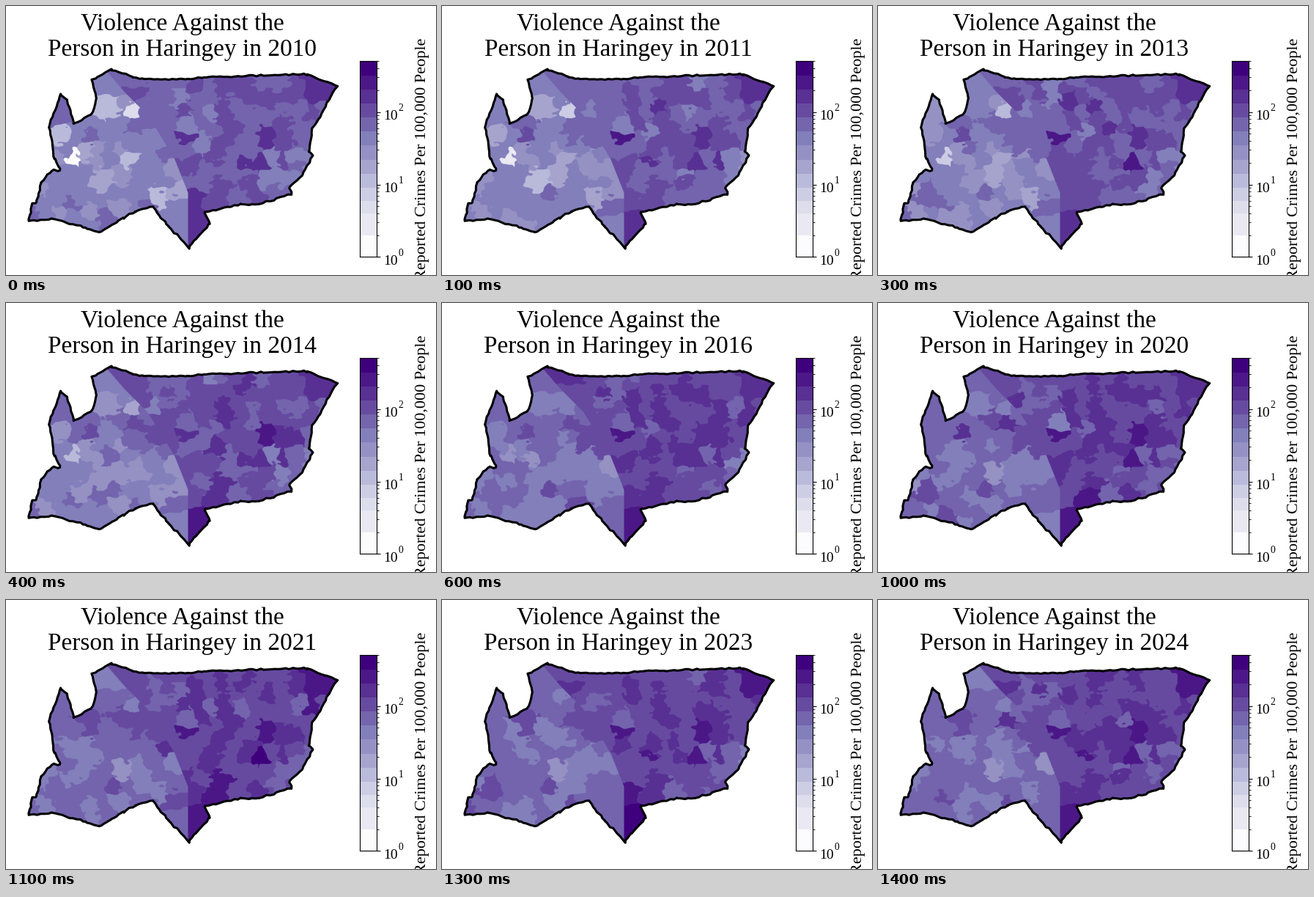
These frames come from a looping animation (587 px wide and 367 px high, 1.5 s). A matplotlib script:

```python
import numpy as np
import matplotlib.pyplot as plt
from matplotlib.animation import FuncAnimation
from matplotlib.patches import Polygon
from matplotlib.path import Path
from matplotlib.ticker import LogLocator, NullFormatter

W, H, DPI = 587, 367, 100
FIRST, LAST = 2010, 2024
YEARS = np.arange(FIRST, LAST + 1)
CELLS = 150
SPACING = 18

plt.rcParams["font.family"] = "Liberation Serif"
rng = np.random.default_rng(11)

# Colour classes: rounded log-spaced rates per 100,000
EDGES = np.round(np.geomspace(1, 500, 15))
TOP = len(EDGES) - 2
PALETTE = plt.get_cmap("Purples")(np.linspace(0, 1, TOP + 1))[:, :3]

# Corners of the borough, clockwise from the north-west peak
CORNERS = [(144, 87), (173, 97), (188, 100), (246, 100), (273, 97), (410, 93),
           (452, 109), (427, 153), (418, 168), (414, 198), (419, 204),
           (405, 230), (387, 247), (390, 257), (343, 271), (320, 270),
           (271, 282), (278, 297), (250, 329), (222, 301), (200, 273),
           (178, 280), (160, 289), (146, 298), (127, 309), (108, 303),
           (64, 290), (31, 294), (36, 270), (42, 268), (48, 240), (62, 225),
           (74, 224), (66, 208), (59, 163), (75, 120), (84, 130), (93, 161),
           (118, 146), (124, 126), (117, 101)]

# Areas that differ from their surroundings: x, y, reach, class offset
PLACES = [(262, 300, 34, 2), (235, 300, 24, 0), (425, 112, 32, 1.2),
          (243, 180, 19, 2), (357, 178, 19, 1.7), (345, 214, 18, 1.8),
          (290, 243, 18, 1), (113, 178, 19, 1.6), (92, 208, 18, -8),
          (75, 180, 20, -2), (130, 237, 24, -3), (166, 207, 19, -3),
          (140, 137, 24, -2.5), (170, 144, 16, -5), (207, 262, 19, -3),
          (230, 252, 18, -2), (148, 108, 32, 0), (75, 143, 28, 0.3)]


def rail(y):
    """x of the railway that splits the borough."""
    return np.interp(y, [90, 120, 150, 185, 210, 255, 330],
                     [137, 163, 193, 215, 230, 248, 248])


def is_east(x, y):
    return x > rail(y)


def roughen(points, step=5, amount=0.6):
    """Split a closed line into short steps and jitter each one."""
    pts = np.array(points + points[:1], float)
    along = np.r_[0, np.cumsum(np.hypot(*np.diff(pts, axis=0).T))]
    at = np.union1d(np.arange(0, along[-1], step), along[:-1])
    line = np.c_[np.interp(at, along, pts[:, 0]), np.interp(at, along, pts[:, 1])]
    return line + rng.normal(0, amount, line.shape)


def ripple(x, y, waves=14, size=1.0):
    """Irregular smooth noise from randomly aimed sine waves."""
    total = np.zeros_like(x)
    for length in np.geomspace(8, 45, waves):
        angle, phase = rng.uniform(0, 2 * np.pi, 2)
        total += np.sin(2 * np.pi * (x * np.cos(angle) + y * np.sin(angle)) / length
                        + phase)
    return size * total


def make_sites(border):
    """Named areas first, then random cells that fill the widest gaps."""
    shape = Path(border)
    sites = [p[:3] for p in PLACES]
    sites += [(rail(y) - 8, y, 16) for y in (155, 180, 205)]
    while len(sites) < CELLS:
        pts = rng.uniform((30, 85), (452, 330), (40, 2))
        pts = pts[shape.contains_points(pts)]
        room = np.min([np.hypot(*(pts - s[:2]).T) - s[2] for s in sites], axis=0)
        sites.append((*pts[np.argmax(room)], rng.normal(SPACING, 3)))
    return np.array(sites)


def label_cells(sites, x, y):
    """Index of the owning site for each grid point, with ragged edges."""
    wx, wy = x + ripple(x, y), y + ripple(x, y)
    side = is_east(x, y)
    best = np.full(x.shape, np.inf)
    owner = np.zeros(x.shape, int)
    for i, (sx, sy, reach) in enumerate(sites):
        d = np.hypot(wx - sx, wy - sy) - 0.6 * (reach - SPACING)
        d += 1000 * (side != is_east(sx, sy))
        near = d < best
        best[near] = d[near]
        owner[near] = i
    return owner


def make_levels(sites):
    """Colour class of every cell in every year."""
    x, y, _ = sites.T
    usual = np.where(is_east(x, y), 9.4, 7.9)
    usual -= 0.8 * (x + 0.5 * y > 490)  # calmer by the river
    own = np.zeros(len(sites))
    own[len(PLACES):] = rng.normal(0, 0.55, len(sites) - len(PLACES))
    own[:len(PLACES)] = [p[3] for p in PLACES]

    rows = []
    for t in YEARS - FIRST:
        trend = 0.9 / (1 + np.exp(-1.3 * (t - 4.5)))
        # busy areas stay busy, quiet ones catch up
        fade = np.where(own < -1.5, np.exp(-t / 4), 1)
        rows.append(usual + trend + own * fade + rng.normal(0, 0.35, len(sites)))
    classes = np.clip(np.round(rows), 0, TOP).astype(int)
    classes[classes == 1] = 2  # the second class is empty after rounding
    return classes


def draw_scale(fig, stage):
    left, base, width, height = 483, 342.5, 23, 267
    bar = fig.add_axes([left / W, 1 - base / H, width / W, height / H])
    bar.set_yscale("log")
    bar.set_ylim(EDGES[0], EDGES[-1])
    bar.set_xticks([])
    for low, high, color in zip(EDGES, EDGES[1:], PALETTE):
        if high > low:
            bar.axhspan(low, high, color=color, lw=0)
    bar.yaxis.tick_right()
    bar.yaxis.set_minor_locator(LogLocator(subs=range(2, 10)))
    bar.yaxis.set_minor_formatter(NullFormatter())
    bar.tick_params(axis="y", labelright=False)

    decade = height / np.log10(EDGES[-1])
    for power in range(3):
        y = base - power * decade
        stage.text(515.6, y + 10.5, "10", size=14)
        stage.text(535.4, y - 1.2, str(power), size=9.8)


fig = plt.figure(figsize=((W + 1e-6) / DPI, (H + 1e-6) / DPI), dpi=DPI,
                 facecolor="white")
stage = fig.add_axes([0, 0, 1, 1])
stage.axis("off")

left, right, top, bottom = 25, 460, 80, 335
gx, gy = np.meshgrid(np.arange(left, right, 0.5) + 0.25,
                     np.arange(top, bottom, 0.5) + 0.25)
border = roughen(CORNERS)
sites = make_sites(border)
owner = label_cells(sites, gx, gy)
levels = make_levels(sites)

area = stage.imshow(PALETTE[levels[0]][owner], extent=(left, right, bottom, top),
                    aspect="auto")
stage.set_xlim(0, W)
stage.set_ylim(H, 0)
stage.add_patch(Polygon(border, fill=False, ec="black", lw=2.2, joinstyle="round"))
area.set_clip_path(Path(np.r_[border, border[:1]]), stage.transData)

stage.text(240.8, 33, "Violence Against the", size=24, ha="center")
title = stage.text(240.8, 68, "", size=24, ha="center")
stage.text(573, 208.5, "Reported Crimes Per 100,000 People", size=16, rotation=90,
           rotation_mode="anchor", ha="center")
draw_scale(fig, stage)


def update(i):
    area.set_data(PALETTE[levels[i]][owner])
    title.set_text(f"Person in Haringey in {YEARS[i]}")
    return area, title


anim = FuncAnimation(fig, update, frames=len(YEARS), interval=100,
                     repeat=True, repeat_delay=0)
plt.show()
```
